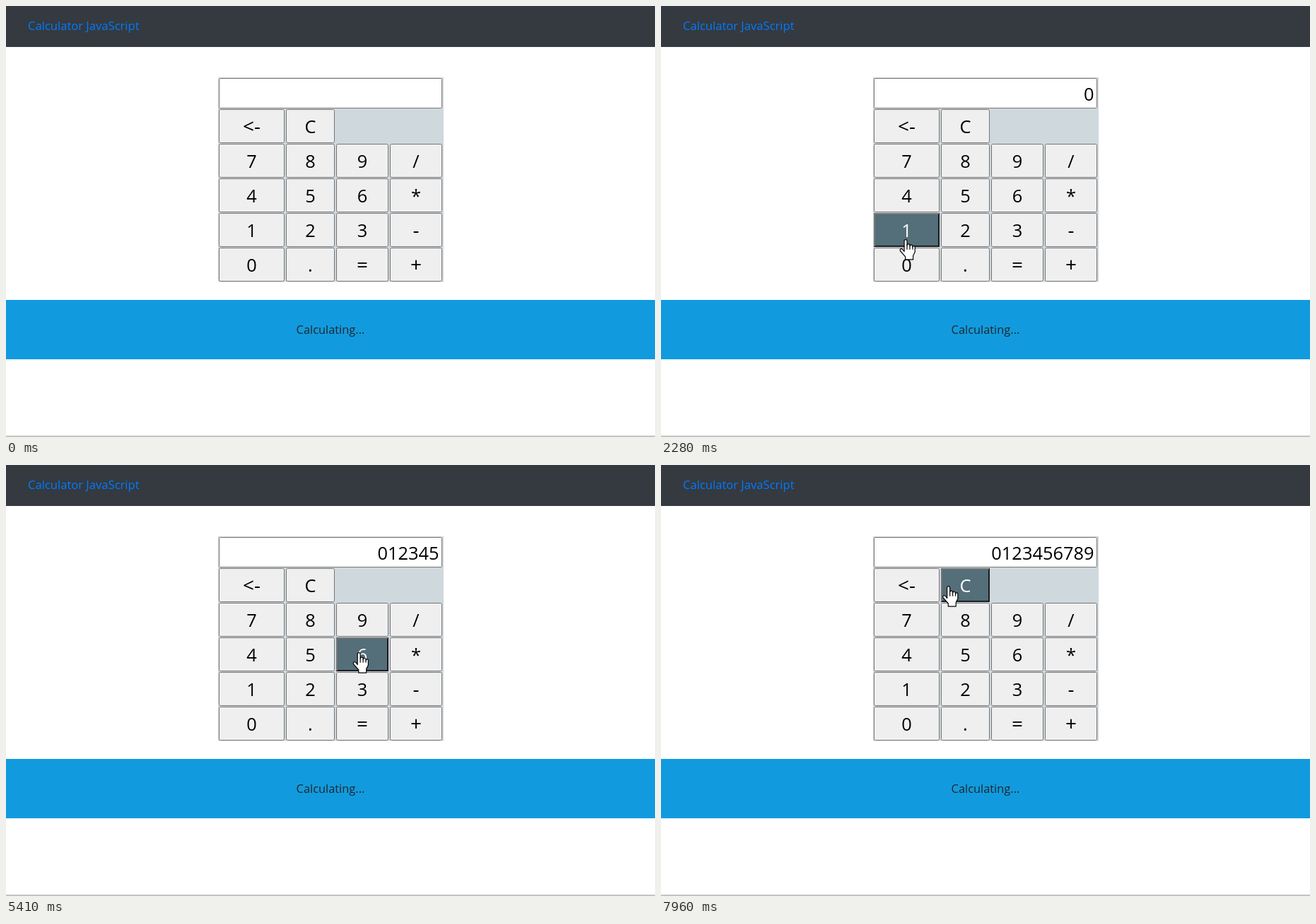
An HTML page with a canvas for the animation above (8000 ms loop, 918 by 610 pixels).

```html
<!DOCTYPE html>
<html lang="en">
<head>
<meta charset="utf-8">
<title>Calculator JavaScript</title>
<style>
  html, body { margin: 0; width: 100%; height: 100%; overflow: hidden; background: #fff; }
  canvas { display: block; width: 918px; height: 610px; }
</style>
</head>
<body>
<canvas id="stage"></canvas>
<script>
const W = 918, H = 610, LOOP = 8000;
const canvas = document.getElementById('stage');
const dpr = window.devicePixelRatio || 1;
canvas.width = W * dpr;
canvas.height = H * dpr;
const ctx = canvas.getContext('2d');
ctx.scale(dpr, dpr);

const FONT = '"Open Sans", "Noto Sans", sans-serif';
const GRAY = '#767676', SLATE = '#546e7a';
const EDGES = [301, 396, 467, 543, 619];
const ROWS = [['<-', 'C'], ['7', '8', '9', '/'], ['4', '5', '6', '*'], ['1', '2', '3', '-'], ['0', '.', '=', '+']];

const keys = ROWS.flatMap((row, r) => row.map((label, c) => ({
  label, x: EDGES[c], y: 146 + r * 49, w: EDGES[c + 1] - EDGES[c] - 2, h: 48
})));

// The digits 0 to 9 are pressed in order; later presses are shorter.
const presses = [1560, 2610, 3010, 3470, 4090, 4700, 5560, 5960, 6720, 7260]
  .map((down, i) => ({ down, up: down + (i < 5 ? 230 : 160) }));

const route = [];
const go = (start, end, x, y) => route.push({ start, end, x, y });

// Enter from below, wander over the 6, then settle on the 0.
go(70, 70, 765, 592);
go(120, 180, 643, 378);
go(410, 490, 500, 272);
go(790, 1330, 372, 338);
go(1410, 1480, 343, 351);

// From digit to digit: rest, travel, rest, stopping a little short of the centre.
for (let i = 1; i < presses.length; i++) {
  const { x, y, w, h } = keys.find(k => k.label === String(i));
  const from = route[route.length - 1];
  const { down } = presses[i], { up } = presses[i - 1];
  const gap = down - up, cx = x + w / 2;
  go(up + gap * 0.3, down - gap * 0.22, cx - (cx - from.x) * 0.07, y + h / 2 - 3);
}
go(7650, 7960, 406, 171);

const HAND = new Path2D('M5 13V2a1.5 1.5 0 0 1 3 0V6.5a1.5 1.3 0 0 1 3 0V7.5a1.5 1.3 0 0 1 3 0V8.5a1.25 1.2 0 0 1 2.5 0V13.5L14.5 17.5V21.5H6.2V18.5L.8 12.5Q0 10.6 1.6 10.2Q3 10 5 13Z');
const KNUCKLES = new Path2D('M8 6V11M11 7V11M14 8V11');
const ARROW = new Path2D('M0 0V17L4 13.2L6.8 20L9.4 18.9L6.6 12.3H12Z');

function pointerAt(t) {
  let pos = null;
  for (const { start, end, x, y } of route) {
    if (t < start) break;
    const hops = Math.round((end - start) / 70);
    const f = t >= end ? 1 : (Math.floor((t - start) / (end - start) * hops) + 1) / (hops + 1);
    const from = pos || { x, y };
    pos = { x: from.x + (x - from.x) * f, y: from.y + (y - from.y) * f };
  }
  return pos;
}

function rect(x, y, w, h, color) {
  ctx.fillStyle = color;
  ctx.fillRect(x, y, w, h);
}

function text(str, x, y, size, color, align) {
  ctx.font = `${size}px ${FONT}`;
  ctx.textAlign = align;
  ctx.fillStyle = color;
  ctx.fillText(str, x, y);
}

function box(x, y, w, h, fill, stroke, line, radius) {
  ctx.beginPath();
  ctx.roundRect(x + line / 2, y + line / 2, w - line, h - line, radius);
  ctx.fillStyle = fill;
  ctx.fill();
  ctx.strokeStyle = stroke;
  ctx.lineWidth = line;
  ctx.stroke();
}

function drawKey({ label, x, y, w, h }, hover, focus) {
  if (!hover) {
    box(x, y, w, h, '#efefef', GRAY, 1, 2);
  } else if (focus) {
    box(x - 1, y - 1, w + 2, h + 2, '#fff', '#fff', 1, 3);
    box(x, y, w, h, SLATE, '#101010', 2, 2);
  } else {
    rect(x, y, w, h, '#1c1c1c');
    rect(x, y, w - 1, h - 1, GRAY);
    rect(x + 2, y + 2, w - 2, h - 2, '#1c1c1c');
    rect(x + 2, y + 2, w - 4, h - 4, SLATE);
  }
  const size = /[<=+-]/.test(label) ? 28 : 25.4;
  text(label, x + w / 2, y + 34, size, hover ? '#fff' : '#000', 'center');
}

function drawPointer({ x, y }, hand) {
  ctx.save();
  ctx.translate(x, y);
  ctx.scale(1.32, 1.35);
  ctx.fillStyle = '#fff';
  ctx.strokeStyle = '#000';
  ctx.lineWidth = 0.9;
  ctx.lineJoin = 'round';
  if (hand) {
    ctx.translate(-6, 0);
    ctx.fill(HAND);
    ctx.stroke(HAND);
    ctx.stroke(KNUCKLES);
  } else {
    ctx.scale(1.15, 1.15);
    ctx.fill(ARROW);
    ctx.stroke(ARROW);
  }
  ctx.restore();
}

function draw(t) {
  const pointer = pointerAt(t);
  const hovered = pointer && keys.find(k =>
    pointer.x >= k.x && pointer.x <= k.x + k.w && pointer.y >= k.y && pointer.y <= k.y + k.h);
  const begun = presses.filter(p => t >= p.down).length;
  const typed = presses.filter(p => t >= p.up).length;
  const focused = String(begun - 1);

  rect(0, 0, W, H, '#fff');
  rect(0, 0, W, 58, '#343a40');
  text('Calculator JavaScript', 31, 33.5, 16.6, '#007bff', 'left');
  rect(0, 416, W, 84, '#119bde');
  text('Calculating...', 459, 463.5, 16.4, '#212529', 'center');
  rect(0, 608, W, 2, '#c4c4c4');

  rect(300, 101, 319, 289.5, '#cfd8dd');
  box(301, 102, 316, 43, '#fff', GRAY, 1, 1);
  text('0123456789'.slice(0, typed), 612.5, 133.5, 25.4, '#000', 'right');
  keys.forEach(k => drawKey(k, k === hovered, k.label === focused));

  if (pointer) drawPointer(pointer, hovered);
  if (begun > typed) {
    ctx.fillStyle = 'rgba(255, 255, 0, 0.5)';
    ctx.beginPath();
    ctx.arc(pointer.x, pointer.y, 17.5, 0, Math.PI * 2);
    ctx.fill();
  }
}

const began = performance.now();
function tick() {
  draw((performance.now() - began) % LOOP);
  requestAnimationFrame(tick);
}
tick();
</script>
</body>
</html>
```
